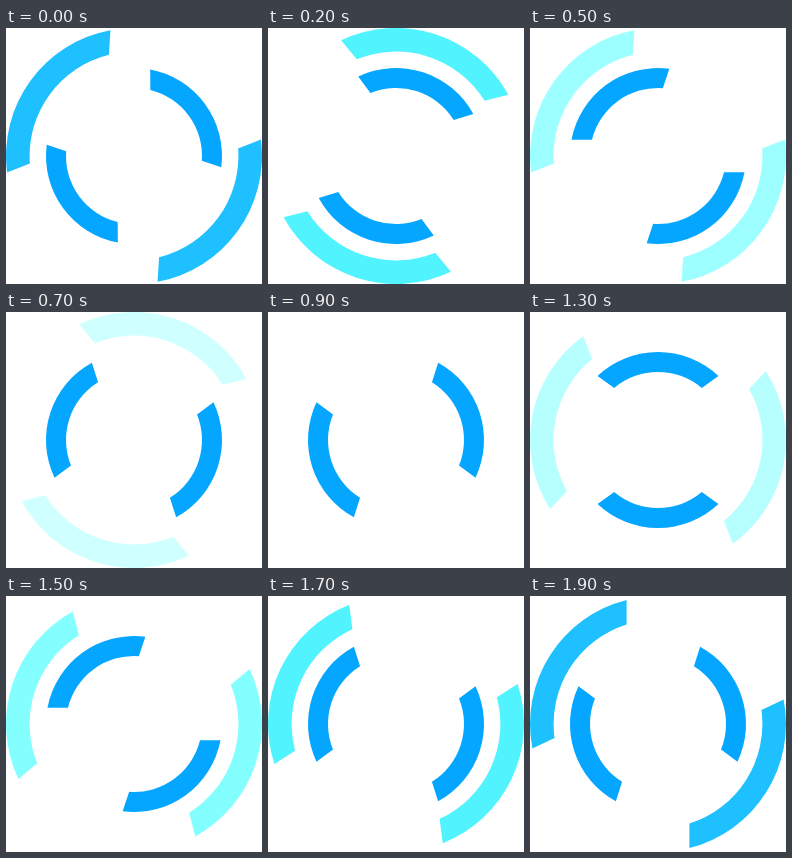
These frames come from a looping animation (256 px wide and 256 px high, 2000 ms). An HTML page with a canvas:

```html
<!DOCTYPE html>
<html lang="en">
<head>
<meta charset="utf-8">
<title>Spinner</title>
<style>
  html, body { margin: 0; width: 100%; height: 100%; overflow: hidden; background: #fff; }
  canvas { display: block; width: 100vw; height: 100vh; }
</style>
</head>
<body>
<canvas id="stage"></canvas>
<script>
const SIZE = 256, CENTER = SIZE / 2;
const STEP_MS = 100, STEPS = 20, HALF = STEPS / 2;
const BASE = [4, 166, 255];

const rad = deg => deg * Math.PI / 180;

// Each arc reaches further along its outer edge than along its inner one.
const SPAN_OUT = rad(43.4), SPAN_IN = rad(40.1);
const OUTER = { R: 128, r: 104.4 };
const INNER = { R: 88, r: 68 };

const canvas = document.getElementById('stage');
const ctx = canvas.getContext('2d');
const scale = window.devicePixelRatio || 1;
canvas.width = canvas.height = Math.round(SIZE * scale);

// Adds light to the base colour; channels clip at white.
function lighten(amount) {
  return `rgb(${BASE.map(c => Math.min(255, Math.round(c + amount))).join(',')})`;
}

// Two opposite arcs; angle is counterclockwise from the right.
function drawPair(ring, angle, color) {
  ctx.fillStyle = color;
  for (const turn of [0, 180]) {
    const mid = rad(turn - angle);
    ctx.beginPath();
    ctx.arc(CENTER, CENTER, ring.R, mid - SPAN_OUT, mid + SPAN_OUT);
    ctx.arc(CENTER, CENTER, ring.r, mid + SPAN_IN, mid - SPAN_IN, true);
    ctx.closePath();
    ctx.fill();
  }
}

function draw(step) {
  const rising = step < HALF;
  const light = 25.5 * (rising ? step + 1 : STEPS - step);
  // A fast full turn while fading out, then a slow drift while returning.
  const outerAngle = rising ? 144 - 36 * step : 180 - 3.6 * (step - HALF);

  ctx.setTransform(scale, 0, 0, scale, 0, 0);
  ctx.fillStyle = '#fff';
  ctx.fillRect(0, 0, SIZE, SIZE);
  drawPair(OUTER, outerAngle, lighten(light));
  drawPair(INNER, 36 + 18 * step, lighten(0));
}

let start = null;
function tick(now) {
  if (start === null) start = now;
  draw(Math.floor(Math.max(0, now - start) / STEP_MS) % STEPS);
  requestAnimationFrame(tick);
}

draw(0);
requestAnimationFrame(tick);
</script>
</body>
</html>
```
